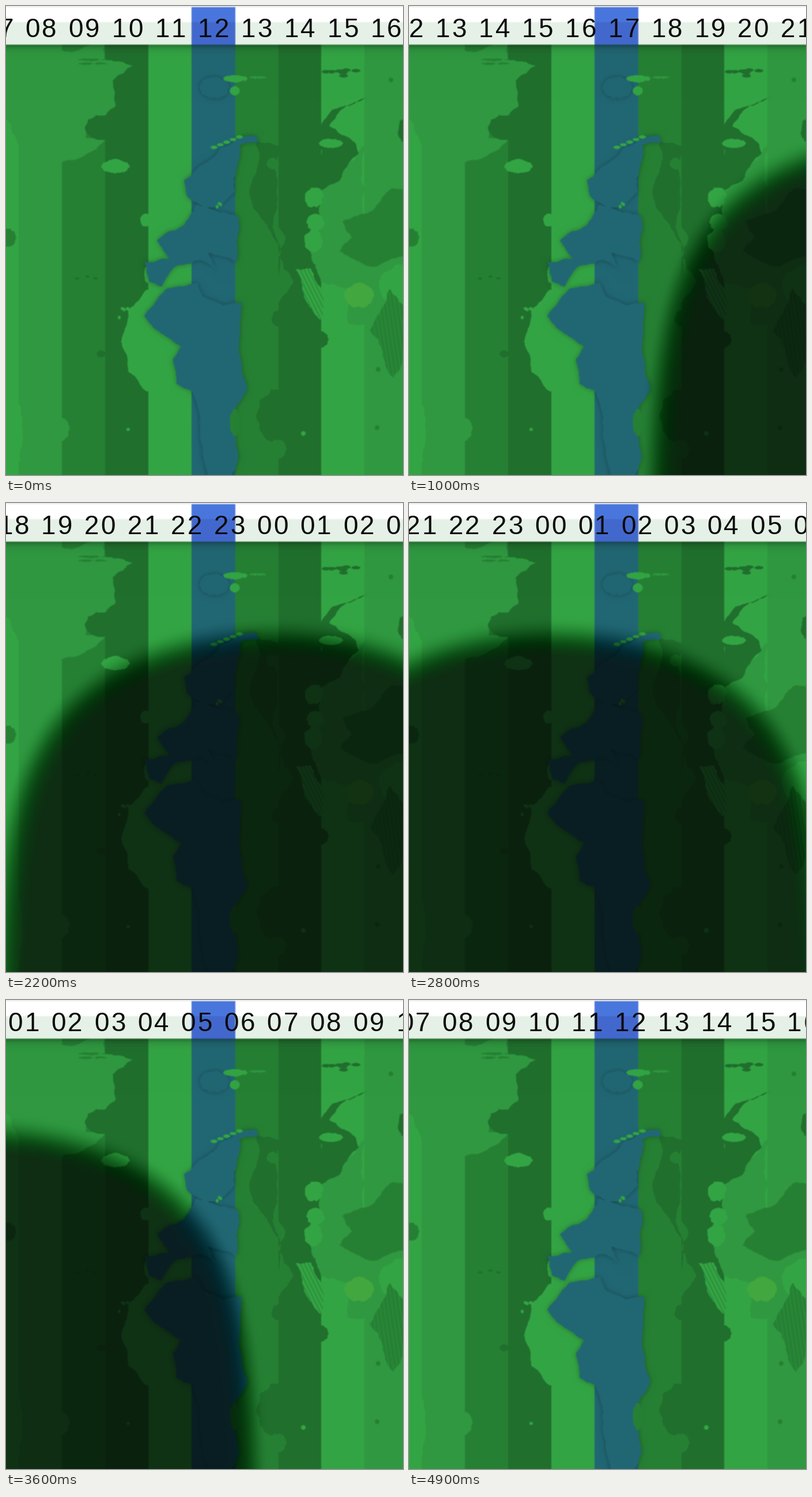
A matplotlib script for the animation above (5000 ms loop, 689 px wide and 813 px high).

```python
import numpy as np
import matplotlib.pyplot as plt
from matplotlib.animation import FuncAnimation
from matplotlib.path import Path

W, H = 689, 813
FRAMES, INTERVAL = 50, 100
HOUR_W = 74.85
PERIOD = 1797
HOURS_PER_FRAME = 29 / 60
MID_X = 360
FIRST_EDGE = 22
HEADER = 68

LIGHT = (51, 164, 68)
MEDIUM = (47, 152, 64)
DEEP = (38, 128, 52)
DARK = (32, 111, 45)
TEAL = (33, 103, 115)
OLIVE = (66, 167, 62)
ZONES = (LIGHT, MEDIUM, DEEP, DARK)

rng = np.random.default_rng(4)
base = np.empty((H, W, 3), np.float32)
yy, xx = np.mgrid[:H, :W]
column = (np.arange(W) - FIRST_EDGE) // HOUR_W + 1
home = column == 5


def blur(mask, r):
    out = np.pad(mask, r, mode="edge")
    for axis in (0, 1):
        out = sum(np.roll(out, s, axis) for s in range(-r, r + 1)) / (2 * r + 1)
    return out[r:-r, r:-r]


def ragged(a, b, rough):
    """Points from a up to b, displaced at every midpoint like a coastline."""
    step = b - a
    if np.hypot(*step) < 6:
        return [a]
    normal = np.array([-step[1], step[0]])
    mid = (a + b) / 2 + normal * rng.uniform(-rough, rough)
    return ragged(a, mid, rough) + ragged(mid, b, rough)


def land(color, *xy, rough=.1):
    pts = np.array(xy, float).reshape(-1, 2)
    outline = [p for a, b in zip(pts, np.roll(pts, -1, axis=0))
               for p in ragged(a, b, rough)]
    grid = np.c_[xx.ravel(), yy.ravel()] + .5
    low, high = np.min(outline, axis=0), np.max(outline, axis=0)
    near = ((grid >= low) & (grid <= high)).all(axis=1)
    mask = np.zeros(H * W, bool)
    mask[near] = Path(outline).contains_points(grid[near])
    mask = mask.reshape(H, W)
    base[mask] = color
    return mask


def blob(color, cx, cy, rx, ry, rough=.12):
    a = np.arange(10) * np.pi / 5
    xy = np.c_[cx + rx * np.cos(a), cy + ry * np.sin(a)]
    return land(color, *xy.ravel(), rough=rough)


def dots(color, cx, cy, spread, count, rx=3, ry=3):
    for x, y in rng.normal((cx, cy), spread, (count, 2)):
        blob(color, x, y, rx, ry)


def hatch(mask, color, slope):
    lines = mask & ((xx + yy * slope) % 7 < 2)
    base[lines] += (np.array(color) - base[lines]) * .45


def paint_west():
    land(MEDIUM, -9, 60, 172, 60, 172, 95, 220, 104, 185, 130, 190, 175, 140, 205,
         138, 230, 172, 234, 97, 272, 22, 272, 8, 205, -9, 194)
    blob(DARK, 165, 211, 28, 22)
    for y in (94, 101):
        blob(DEEP, 150, y, 26, 2)
    blob(LIGHT, 190, 279, 25, 12)
    blob(LIGHT, 8, 740, 21, 78)
    blob(MEDIUM, 97, 734, 13, 20)
    blob(DEEP, 2, 402, 16, 16)
    blob(DARK, 165, 603, 8, 6)
    dots(DARK, 143, 470, (11, 3), 3, 4, 2)
    dots(LIGHT, 206, 528, (7, 5), 5)
    blob(LIGHT, 212, 734, 3, 3)
    blob(LIGHT, 242, 372, 9, 12)
    blob(LIGHT, 246, 465, 6, 16)
    blob(LIGHT, 262, 580, 62, 92, rough=.08)


def paint_east():
    land(DARK, 433, 235, 472, 243, 472, 412, 442, 370, 422, 330, 437, 275)
    blob(DEEP, 462, 274, 11, 10)
    land(DEEP, 468, 380, 484, 405, 472, 432, 498, 478, 468, 528)
    blob(DARK, 471, 542, 11, 14)
    blob(DARK, 470, 710, 37, 47)
    blob(DEEP, 470, 768, 16, 17)

    land(MEDIUM, 625, 238, 610, 258, 580, 282, 578, 304, 545, 322, 545, 478,
         590, 490, 592, 550, 625, 550)
    land(DARK, 543, 212, 566, 180, 625, 160, 582, 180, 560, 209, 606, 239,
         611, 256, 578, 304, 543, 322, rough=.08)
    blob(LIGHT, 563, 239, 21, 8)
    for x, y, ry in ((534, 333, 18), (536, 376, 15), (533, 408, 20)):
        blob(LIGHT, x, y, 16, ry, rough=.25)
    land(DEEP, 583, 375, 640, 350, 666, 318, 699, 318, 699, 430, 640, 452,
         578, 425, 600, 402)
    blob(LIGHT, 686, 485, 40, 38)
    blob(OLIVE, 612, 502, 26, 22)
    blob(DARK, 546, 578, 13, 14)
    hatch(land(LIGHT, 500, 456, 528, 455, 547, 490, 547, 545), DARK, -.5)
    hatch(land(DEEP, 665, 490, 689, 520, 689, 600, 671, 645, 645, 577, 630, 562),
          MEDIUM, -.15)

    blob(DARK, 688, 217, 8, 20, rough=.25)
    dots(DARK, 580, 114, (15, 4), 8, 8, 3)
    for x, y in ((643, 731), (645, 630), (667, 129)):
        blob(DEEP, x, y, 4, 4)
    blob(LIGHT, 515, 741, 4, 4)


def paint_home():
    teal = blob(TEAL, 361, 143, 25, 19)
    teal |= land(TEAL, 309, 304, 346, 273, 374, 246, 396, 234, 433, 226, 436, 238,
                 404, 243, 404, 266, 394, 300, 396, 322, 360, 350, 316, 333)
    teal |= land(TEAL, 330, 345, 360, 355, 403, 367, 398, 445, 350, 428, 379, 471,
                 337, 440, 298, 450, 270, 487, 248, 478, 240, 443, 284, 438,
                 262, 407, 308, 382)
    teal |= land(TEAL, 278, 490, 332, 480, 340, 502, 376, 519, 408, 514, 403, 600,
                 418, 662, 398, 695, 402, 787, 387, 820, 352, 820, 336, 706,
                 322, 667, 296, 655, 290, 612, 304, 590, 240, 537, rough=.06)
    shadow = blur(blur(teal.astype(float), 5), 5) * ~teal
    base[:] *= (1 - .3 * shadow)[..., None]

    blob(DEEP, 396, 722, 9, 24)
    blob(LIGHT, 397, 127, 22, 6)
    blob(LIGHT, 396, 148, 9, 8)
    blob(MEDIUM, 436, 125, 15, 2)
    for k in range(5):
        blob(LIGHT, 360 + 11 * k, 246 - 4.5 * k, 6, 3)
    dots(LIGHT, 372, 345, (5, 3), 3, 3, 3)


def paint_header():
    depth = np.arange(H - HEADER)
    base[HEADER:] *= (1 - .32 * np.exp(-depth / 6))[:, None, None]
    for y0, y1, paper, mark in ((3, 29, (255, 255, 255), (73, 118, 221)),
                                (29, HEADER, (229, 241, 230), (67, 104, 205))):
        base[y0:y1] = paper
        base[y0:y1, home] = mark
    base[:3] = 235


def night_fields():
    """Brightness factor and contrast loss around the day-night line, one full turn wide."""
    y = np.arange(H)
    level = 1.07 * np.exp((236 - y) / 135) - .07
    angle = (np.arange(PERIOD) - PERIOD / 2) * 2 * np.pi / PERIOD
    field = np.cos(angle)[None] - level[:, None]
    gy, gx = np.gradient(field)
    t = np.clip(field / np.hypot(gx, gy) / 76 + .46, 0, 1)
    t = t * t * (3 - 2 * t)
    t[:HEADER] = 0
    return ((1 - .7 * t).astype(np.float32),
            (17 * np.sin(np.pi * t)).astype(np.float32))


base[:] = [TEAL if c == 5 else ZONES[int(c) % 4] for c in column]
paint_west()
paint_east()
paint_home()
paint_header()
base = np.dstack([blur(base[..., c], 1) for c in range(3)])
gain, loss = night_fields()

fig = plt.figure(figsize=((W + .001) / 100, (H + .001) / 100), dpi=100)
ax = fig.add_axes([0, 0, 1, 1])
ax.axis("off")
picture = ax.imshow(base.astype(np.uint8), extent=(0, W, H, 0),
                    interpolation="nearest", aspect="auto")
ax.set(xlim=(0, W), ylim=(H, 0))

labels = [[ax.text(0, 54, "0", ha="center", va="baseline", color="#0a0a0a",
                   fontsize=33, family="Liberation Sans", clip_on=True)
           for _ in range(2)] for _ in range(13)]


def update(i):
    hour = 12 + HOURS_PER_FRAME * i
    midnight = MID_X + (24 - hour) * HOUR_W
    cols = np.rint(np.arange(W) - midnight + PERIOD / 2).astype(int) % PERIOD
    shaded = base * gain[:, cols, None] - loss[:, cols, None]
    picture.set_data(np.clip(shaded, 0, 255).astype(np.uint8))
    for k, pair in enumerate(labels):
        n = round(hour) + k - 6
        x = MID_X + (n - hour) * HOUR_W
        for text, char, side in zip(pair, f"{n % 24:02d}", (-1, 1)):
            text.set_text(char)
            text.set_x(x + side * 14.4)
    return [picture, *(t for pair in labels for t in pair)]


anim = FuncAnimation(fig, update, frames=FRAMES, interval=INTERVAL,
                     repeat=True, repeat_delay=0, blit=False)
plt.show()
```
